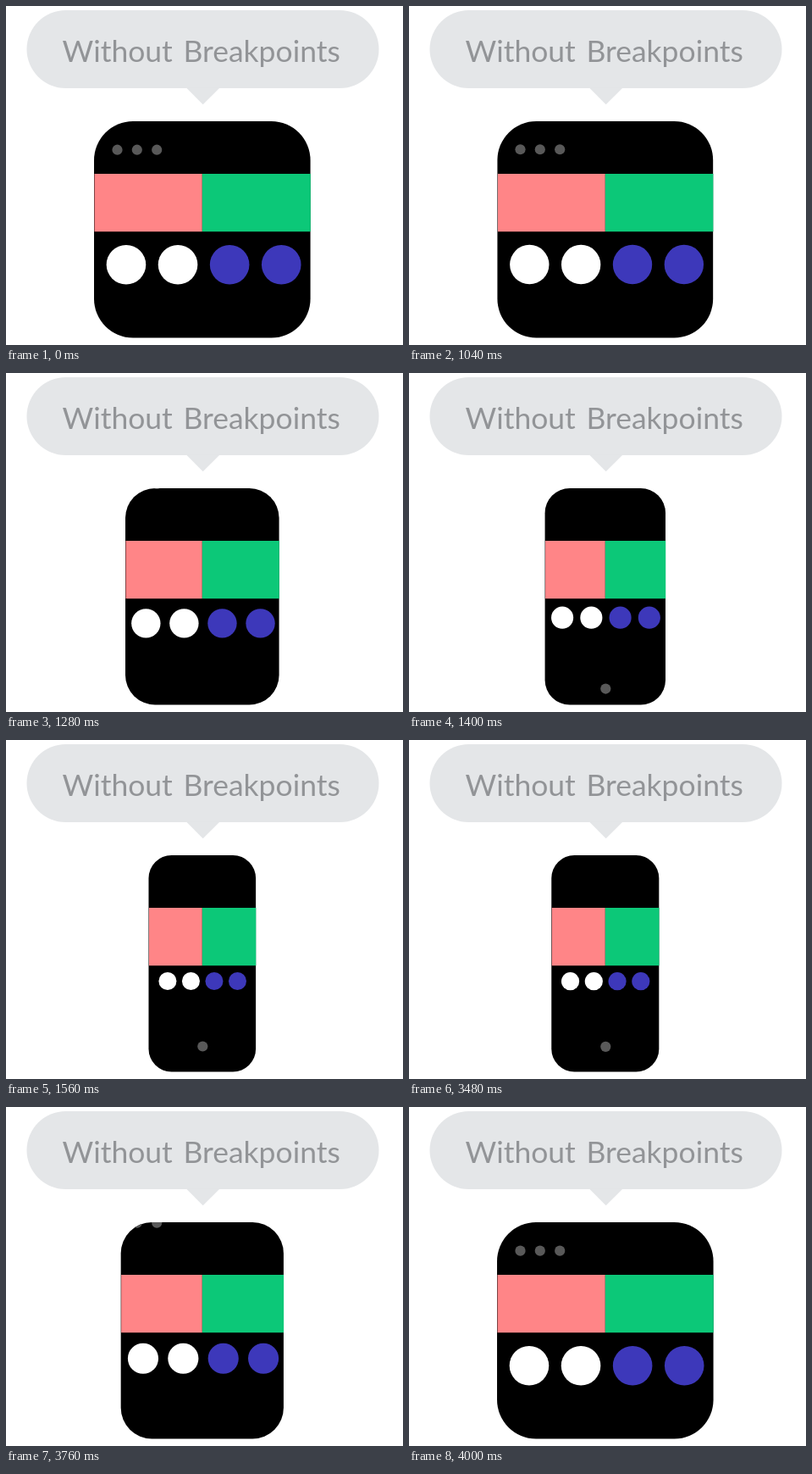
These frames come from a looping animation (469x400 px, 5.04 s). An HTML page:

```html
<!DOCTYPE html>
<html lang="en">
<head>
<meta charset="utf-8">
<title>Without Breakpoints</title>
<style>
  html, body { margin: 0; width: 100%; height: 100%; overflow: hidden; background: #fff; }
  svg { display: block; width: 469px; height: 400px; }
  text { font: 400 35.5px Lato, "Open Sans", sans-serif; word-spacing: 3.5px; fill: #929497; }
  .bubble { fill: #e4e6e8; }
  .grey { fill: #595959; }
  .white { fill: #fff; }
  .blue { fill: #3d38ba; }
</style>
</head>
<body>
<svg viewBox="0 0 469 400">
  <defs>
    <clipPath id="clip"><rect class="device" y="136" height="255.5"/></clipPath>
  </defs>
  <g class="bubble">
    <rect x="24.5" y="5" width="416" height="92" rx="46"/>
    <path d="M213 96.5h39.5L232.7 116.3z"/>
  </g>
  <text x="66.5" y="65.5">Without Breakpoints</text>

  <rect class="device" y="136" height="255.5"/>
  <g class="grey" clip-path="url(#clip)">
    <g id="dots">
      <circle cx="131.5" cy="169.7" r="6.1"/>
      <circle cx="154.8" cy="169.7" r="6.1"/>
      <circle cx="178.2" cy="169.7" r="6.1"/>
    </g>
    <circle id="home" cx="232.3" cy="361.5" r="6.1"/>
  </g>
  <rect id="left" y="198" height="68.2" fill="#ff8587"/>
  <rect id="right" x="231.8" y="198" height="68.2" fill="#0cc878"/>
  <g id="discs">
    <circle class="white"/><circle class="white"/>
    <circle class="blue"/><circle class="blue"/>
  </g>
</svg>
<script>
  const LOOP = 5040, TICK = 40, MOVE = 560, SHRINK = 1008, GROW = 3448, MID = 231.8;
  const $ = id => document.getElementById(id);
  const devices = document.querySelectorAll('.device');
  const discs = [...$('discs').children];

  const set = (el, attrs) => {
    for (const key in attrs) el.setAttribute(key, attrs[key]);
  };
  const mix = (a, b, p) => a + (b - a) * p;
  const clamp = v => Math.min(1, Math.max(0, v));

  // cubic-bezier(x1, 0, x2, 1), solved by bisection
  function ease(u, x1, x2) {
    let lo = 0, hi = 1, s = 0.5;
    for (let i = 0; i < 24; i++) {
      s = (lo + hi) / 2;
      const r = 1 - s;
      const x = 3 * r * r * s * x1 + 3 * r * s * s * x2 + s * s * s;
      if (x < u) lo = s; else hi = s;
    }
    return s * s * (3 - 2 * s);
  }

  // 0 is the wide window, 1 the phone; growing replays shrinking backwards
  function phase(t) {
    return t < GROW ? clamp((t - SHRINK) / MOVE) : 1 - clamp((t - GROW) / MOVE);
  }

  function draw(t) {
    const u = phase(t);
    const body = ease(u, 0.42, 0.44);
    const disc = ease(u, 0.38, 0.62);

    const w = mix(255.6, 126.6, body), x = MID - w / 2;
    devices.forEach(d => set(d, { x, width: w, rx: mix(46, 27, body) }));
    set($('left'), { x: x + 0.5, width: w / 2 - 0.5 });
    set($('right'), { width: w / 2 + 0.2 });
    set($('dots'), { transform: `translate(0 ${-67.5 * body})` });
    set($('home'), { transform: `translate(0 ${90 * (1 - body)})` });

    const cx = mix(233.6, 232.2, disc), gap = mix(61.1, 27.5, disc);
    discs.forEach((c, i) => set(c, {
      cx: cx + (i - 1.5) * gap,
      cy: mix(305.2, 284.5, disc),
      r: mix(23.3, 10.5, disc)
    }));
  }

  const start = performance.now();
  function frame() {
    const t = (performance.now() - start) % LOOP;
    draw(Math.floor(t / TICK) * TICK);
    requestAnimationFrame(frame);
  }
  frame();
</script>
</body>
</html>
```
